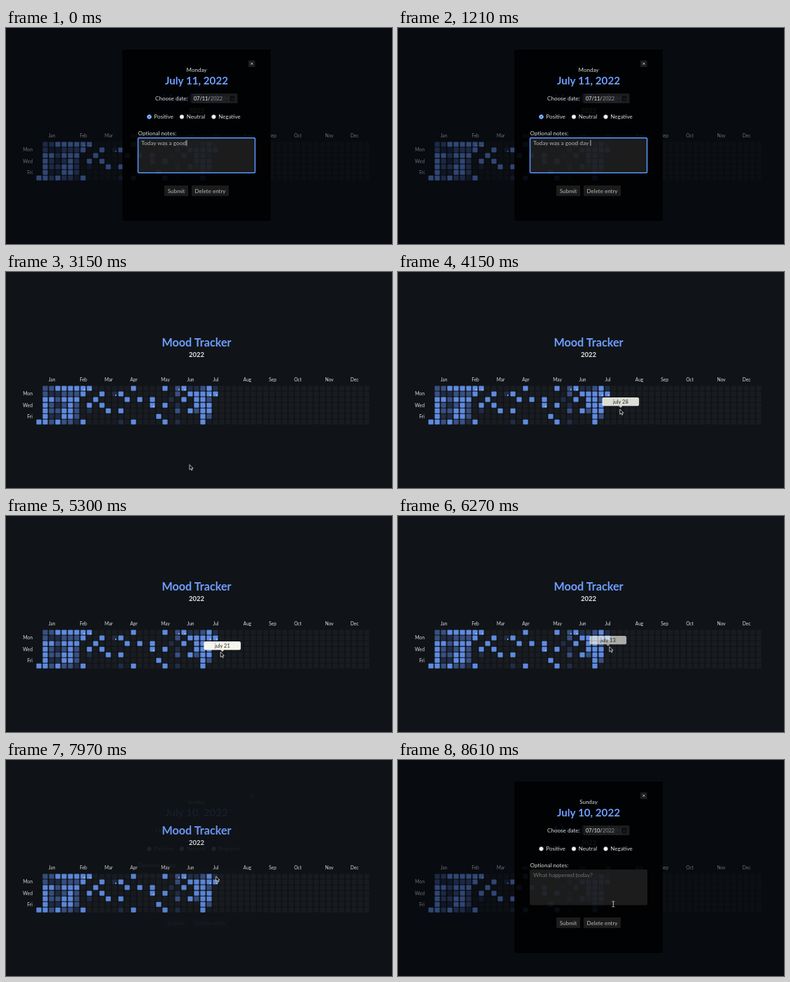
Recreate the animation shown at these times as an HTML page. Size 551 by 310 pixels, loop 8.64 s.

```html
<!DOCTYPE html>
<html lang="en">
<head>
<meta charset="utf-8">
<title>Mood Tracker</title>
<style>
html, body { margin: 0; width: 100%; height: 100%; overflow: hidden; background: #101418; }
svg { display: block; width: 100%; height: 100%; }
text { font-family: Lato, "Open Sans", sans-serif; font-size: 8px; fill: #ddd; white-space: pre; }
</style>
</head>
<body>
<svg id="stage" viewBox="0 0 551 310"></svg>
<script>
const LOOP = 8640;
const stage = document.getElementById('stage');
const BLUE = '#6f9eff';

function add(parent, tag, attrs = {}, content) {
  const node = document.createElementNS('http://www.w3.org/2000/svg', tag);
  for (const key in attrs) node.setAttribute(key, attrs[key]);
  if (content) node.textContent = content;
  parent.append(node);
  return node;
}
const set = (node, attrs) => { for (const key in attrs) node.setAttribute(key, attrs[key]); };
const show = (node, visible) => node.setAttribute('visibility', visible ? 'visible' : 'hidden');
const box = (parent, x, y, width, height, fill, rx = 0) =>
  add(parent, 'rect', { x, y, width, height, fill, rx });

// y is the middle of the capitals
function label(parent, x, y, content, { size = 8, fill = '#ddd', anchor = 'start', weight = 400 } = {}) {
  return add(parent, 'text', {
    x, y: y + size * 0.36, 'text-anchor': anchor, 'font-weight': weight,
    style: `font-size:${size}px;fill:${fill}`
  }, content);
}

// Calendar
const cellX = col => 47 + col * 9;
const cellY = row => 167 + row * 8.05;
const shades = ['#191c20', '#212d46', '#3a5081', '#608be0'];
const moods = [
  '02233333300000030000302311231',
  '02112223003013000000002033333',
  '03323330030000303030010303320',
  '03212320303000000030301003330',
  '03223320100303000000002032330',
  '03113320000000000003000000320',
  '33232213000001030000301000300'
];
const noted = [[7, 0], [8, 0], [12, 1], [22, 0], [23, 0], [27, 1], [28, 1], [18, 3]];
const months = { Jan: 2, Feb: 7, Mar: 11, Apr: 15, May: 20, Jun: 24, Jul: 28, Aug: 33, Sep: 37, Oct: 41, Nov: 46, Dec: 50 };

box(stage, 0, 0, 551, 310, '#101418');
const page = add(stage, 'g');
label(page, 272, 100.8, 'Mood Tracker', { size: 16.2, fill: BLUE, anchor: 'middle', weight: 700 });
label(page, 272, 118.5, '2022', { size: 9.5, fill: '#e4e4e4', anchor: 'middle', weight: 700 });
for (const name in months) {
  label(page, cellX(months[name]) + 0.5, 155, name, { size: 6.6, anchor: 'middle' });
}
['Mon', 'Wed', 'Fri'].forEach((day, i) =>
  label(page, 37.9, cellY(1 + 2 * i), day, { size: 6.7, anchor: 'end' }));
for (let col = 0; col < 53; col++) {
  for (let row = col ? 0 : 6; row < 7; row++) {
    box(page, cellX(col) - 3.6, cellY(row) - 3.5, 7.2, 7, shades[moods[row][col] || 0], 0.8);
  }
}
for (const [col, row] of noted) {
  add(page, 'circle', { cx: cellX(col) + 1.7, cy: cellY(row) + 1.8, r: 0.85, fill: '#cbd8f5' });
}

const tip = add(stage, 'g');
box(tip, -26.3, -6.1, 52.6, 12.2, '#f7f6ec', 2.5);
add(tip, 'path', { d: 'M-2.5 6 L0 8.6 L2.5 6Z', fill: '#f7f6ec' });
const tipText = label(tip, 0, 0.2, 'july 28', { size: 7.4, fill: '#26282b', anchor: 'middle' });

// Entry dialog; its fields are translucent, so the page glimmers through
const dialog = add(stage, 'g');
const field = (x, y, width, height, rx) => {
  const node = box(dialog, x, y, width, height, '#fff', rx);
  set(node, { 'fill-opacity': 0.1 });
  return node;
};
box(dialog, 0, 0, 551, 310, '#000208').setAttribute('opacity', 0.5);
box(dialog, 166, 31, 212, 246, '#000', 2).setAttribute('opacity', 0.84);
box(dialog, 346, 46.5, 9.5, 9.5, '#1d1d1d');
add(dialog, 'path', { d: 'M349.3 49.7l3 3m0-3l-3 3', stroke: '#ddd', 'stroke-width': 0.8 });
const weekday = label(dialog, 272, 60.2, 'Monday', { anchor: 'middle' });
const heading = label(dialog, 272, 75.8, 'July 11, 2022', { size: 15.2, fill: BLUE, anchor: 'middle', weight: 700 });
label(dialog, 213, 100.8, 'Choose date:', { size: 8.1 });
field(264.5, 94, 66, 14);
const dayField = label(dialog, 291.5, 101, '07/11/', { size: 7.3, fill: '#f2f2f2', anchor: 'end' });
label(dialog, 292, 101, '2022', { size: 7.3, fill: '#929292' });
add(dialog, 'path', { d: 'M320 98.5h5.5v5.5h-5.5z M320 100h5.5', fill: 'none', stroke: '#050505', 'stroke-width': 1 });
[[204.5, 'Positive'], [251, 'Neutral'], [296.5, 'Negative']].forEach(([x, name]) => {
  add(dialog, 'circle', { cx: x, cy: 127.4, r: 3, fill: '#f4f4f4', stroke: '#777', 'stroke-width': 0.4 });
  label(dialog, x + 6.8, 127.6, name);
});
const chosen = add(dialog, 'g');
add(chosen, 'circle', { cx: 204.5, cy: 127.4, r: 2.7, fill: '#fff', stroke: '#3478f0', 'stroke-width': 1 });
add(chosen, 'circle', { cx: 204.5, cy: 127.4, r: 1.6, fill: '#3478f0' });
label(dialog, 188.5, 151.2, 'Optional notes:', { size: 8.1 });
const area = field(188.5, 157.7, 167, 50.1, 1.2);
const note = label(dialog, 193, 165.3, '', { size: 8.3, fill: '#b4b4b4' });
const hint = label(dialog, 193, 165.3, 'What happened today?', { size: 8.3, fill: '#707070' });
const caret = box(dialog, 0, 160.8, 0.8, 8.4, '#ddd');
box(dialog, 226, 226, 34, 15.2, '#1c1c1c');
box(dialog, 265, 226, 53, 15.2, '#1c1c1c');
label(dialog, 243, 233.8, 'Submit', { fill: '#b9b9b9', anchor: 'middle' });
label(dialog, 291.5, 233.8, 'Delete entry', { fill: '#b9b9b9', anchor: 'middle' });

// Pointers
const arrow = add(stage, 'path', {
  d: 'M0 0V7.2L1.7 5.7L2.9 8.2L4.1 7.6L3 5.2H5.1Z',
  fill: '#050505', stroke: '#fff', 'stroke-width': 0.7, 'stroke-linejoin': 'round'
});
const beam = add(stage, 'path', {
  d: 'M-1.8 -4Q0 -4 0 -3V3Q0 4 -1.8 4M1.8 -4Q0 -4 0 -3M0 3Q0 4 1.8 4',
  fill: 'none', stroke: '#e8e8e8', 'stroke-width': 0.8
});

// Pointer stops: time, x, y
const route = [
  [1850, 258, 214], [2300, 238.6, 237.4], [2700, 238.6, 237.4], [3100, 262, 276.5],
  [3200, 262, 276.5], [3420, 271, 287], [3640, 334, 281], [3860, 335, 213],
  [4060, 316.8, 197], [4650, 316.8, 197], [4950, 306.3, 195.2], [5900, 306.3, 195.2],
  [6400, 301, 186], [6550, 301, 186], [6860, 299.8, 174], [7150, 299.8, 174],
  [7400, 299.8, 167], [8030, 299.8, 167], [8450, 307.3, 206.8], [LOOP, 307.3, 206.8]
];
const clamp = v => Math.max(0, Math.min(1, v));
const smooth = v => { v = clamp(v); return v * v * (3 - 2 * v); };

function pointerAt(t) {
  let i = 0;
  while (i < route.length - 2 && t >= route[i + 1][0]) i++;
  const [t0, x0, y0] = route[i], [t1, x1, y1] = route[i + 1];
  const k = smooth((t - t0) / (t1 - t0));
  return [x0 + (x1 - x0) * k, y0 + (y1 - y0) * k];
}

function hoveredDay(t) {
  if (t < 3000 || t > 7960) return null;
  const [x, y] = pointerAt(t);
  const col = Math.round((x - 47) / 9), row = Math.round((y - 167) / 8.05);
  return row < 0 || row > 6 || col < 0 || col > 52 ? null : col * 7 + row;
}

function drawTip(t) {
  const day = hoveredDay(t);
  show(tip, day !== null);
  if (day === null) return;
  let age = 0;
  while (age < 180 && hoveredDay(t - age) === day) age += 10;
  const date = new Date(Date.UTC(2022, 0, day - 5));
  const month = Object.keys(months)[date.getUTCMonth()].toLowerCase();
  const names = { jul: 'july', aug: 'august' };
  tipText.textContent = `${names[month] || month} ${date.getUTCDate()}`;
  const col = Math.floor(day / 7);
  set(tip, { transform: `translate(${cellX(col) + 0.8} ${cellY(day % 7) - 13})`, opacity: age / 180 });
}

function drawDialog(t) {
  const second = t > 5000;
  const opacity = second ? smooth((t - 7930) / 260) : 1 - smooth((t - 2690) / 260);
  set(dialog, { opacity });
  show(dialog, opacity > 0);
  weekday.textContent = second ? 'Sunday' : 'Monday';
  heading.textContent = `July ${second ? 10 : 11}, 2022`;
  dayField.textContent = second ? '07/10/' : '07/11/';
  const typed = Math.floor(clamp((t - 150) / 1300) * 7);
  note.textContent = second ? '' : 'Today was a good' + ' day :)'.slice(0, typed);
  const display = on => on ? 'inline' : 'none';
  set(hint, { display: display(second) });
  set(chosen, { display: display(!second) });
  set(caret, { display: display(!second), x: 193.4 + note.getComputedTextLength() });
  set(area, { stroke: second ? '#2a2a2a' : '#5b98ff', 'stroke-width': second ? 0.5 : 1.5 });
}

function draw(t) {
  drawDialog(t);
  drawTip(t);
  const [x, y] = pointerAt(t);
  const inNotes = t > 8100 && y > 180 || t < 2000;
  const transform = `translate(${x} ${y})`;
  set(arrow, { transform });
  set(beam, { transform });
  show(arrow, t >= 1850 && !inNotes);
  show(beam, t >= 1850 && inNotes);
}

const start = performance.now();
function tick() {
  draw((performance.now() - start) % LOOP);
  requestAnimationFrame(tick);
}
tick();
</script>
</body>
</html>
```
